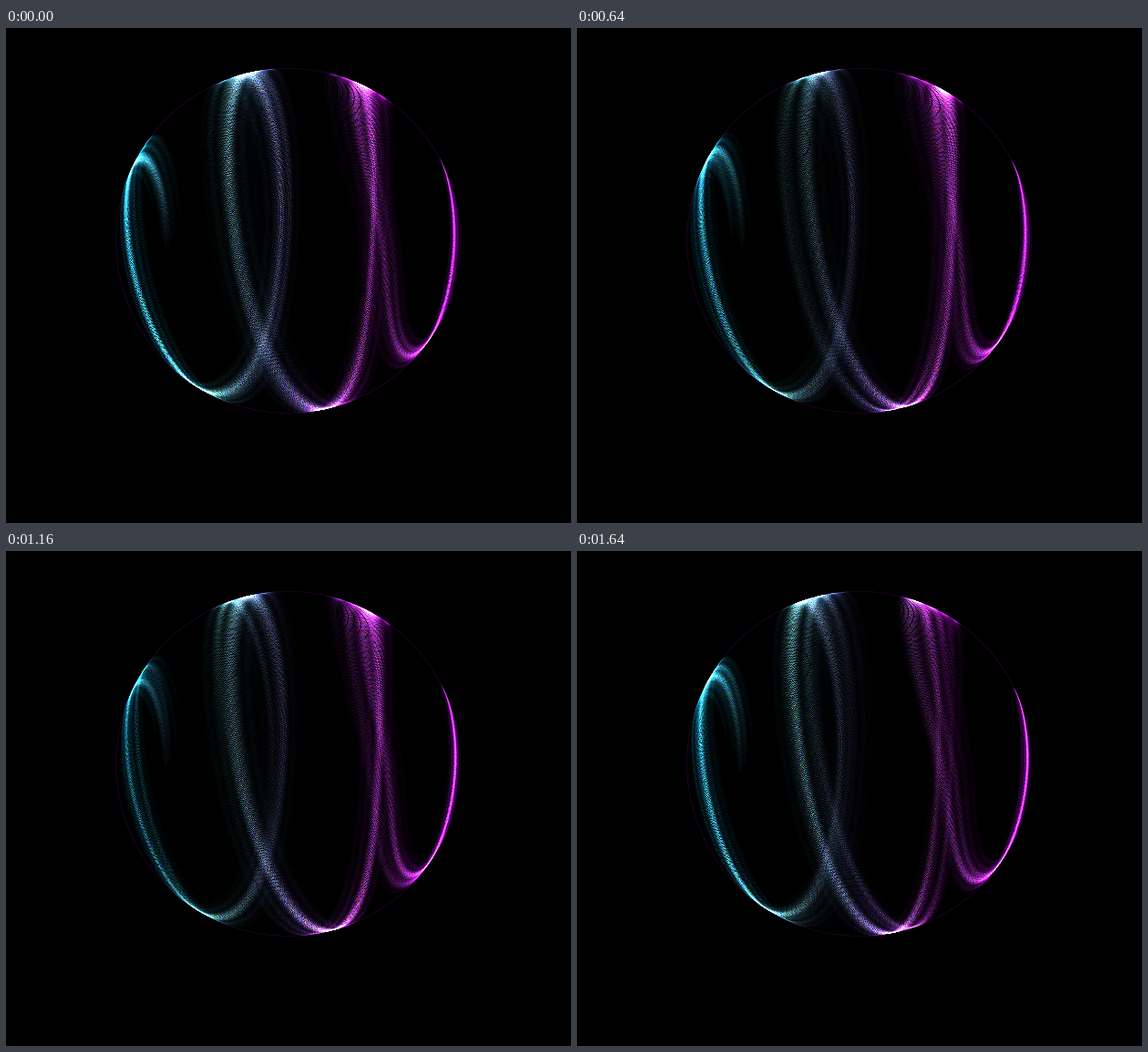
Write an HTML page with a canvas that moves like this. It is 620 px wide and 543 px high and loops after 1680 ms.

```html
<!DOCTYPE html>
<html lang="en">
<head>
<meta charset="utf-8">
<title>Sphere ribbon</title>
<style>
html, body { margin: 0; width: 100%; height: 100%; overflow: hidden; background: #000; }
canvas { display: block; }
</style>
</head>
<body>
<canvas id="stage" width="620" height="543"></canvas>
<script>
const W = 620, H = 543, CX = 309.7, CY = 233.3, R = 189;
const LOOP = 1680, TICK = 40;
const ctx = document.getElementById('stage').getContext('2d');
const img = ctx.createImageData(W, H), px = img.data;

// Ribbon wound around a tilted axis: polar angle and half width (degrees) per quarter turn
const POLAR = [153, 147, 136, 120, 112, 102, 88, 80, 79, 61, 38, 44, 33, 28];
const HALF = [8, 9, 12, 9, 7, 11, 10, 9, 7, 13, 10, 8, 8, 6];
const AXIS_X = 0.944, AXIS_Z = 0.33, TILT = -0.052;

// Bright strand: place across the ribbon and strength, for six half turns at each time
const TIMES = [0, 200, 440, 840, 1160, 1480, 1640];
const PLACE = [
  [0.2, 0, 0, 0.1, 0, 0.2],
  [0.4, -0.7, -0.75, 0, 0.2, 0],
  [-0.6, 0.3, -0.65, -0.4, 0, 0.2],
  [0.4, -0.4, 0.1, -0.3, -0.5, 0],
  [0.2, -0.1, -0.1, -0.2, -0.2, 0],
  [-0.3, 0.1, -0.2, 0, -0.7, -0.2],
  [0, 0.5, 0.2, 0.4, 0.5, -0.2]
];
const POWER = [
  [0.7, 0.9, 0.8, 0.8, 0.5, 0.8],
  [1.1, 0.6, 0.5, 0.7, 0.5, 0.6],
  [0.6, 0.5, 0.8, 0.9, 0.4, 0.7],
  [0.6, 0.3, 0.5, 0.9, 0.5, 1],
  [0.4, 0.5, 0.8, 0.7, 0.5, 0.9],
  [0.6, 0.4, 0.7, 0.9, 0.7, 1],
  [0.7, 0.5, 1, 0.5, 0.5, 0.9]
];
// Colour from left to right: position, r, g, b
const TINT = [[0, 0, 110, 150], [0.3, 30, 80, 85], [0.47, 45, 50, 100], [0.7, 100, 12, 115], [1, 150, 0, 190]];

const clamp = (v, a, b) => Math.min(b, Math.max(a, v));
const mix = (a, b, k) => a + (b - a) * k;
const ease = k => { k = clamp(k, 0, 1); return k * k * (3 - 2 * k); };
const frac = v => v - Math.floor(v);

function spline(list, x) {
  const i = clamp(Math.floor(x), 0, list.length - 2), k = x - i;
  const at = n => list[clamp(n, 0, list.length - 1)];
  const a = at(i - 1), b = at(i), c = at(i + 1), d = at(i + 2);
  return b + 0.5 * k * (c - a + k * (2 * a - 5 * b + 4 * c - d + k * (3 * (b - c) + d - a)));
}

function tint(u) {
  let i = 0;
  while (i < TINT.length - 2 && u > TINT[i + 1][0]) i++;
  const a = TINT[i], b = TINT[i + 1], k = clamp((u - a[0]) / (b[0] - a[0]), 0, 1);
  return [1, 2, 3].map(n => mix(a[n], b[n], k));
}

function project(q, p) {
  const th = (spline(POLAR, q) + p * spline(HALF, q)) * Math.PI / 180;
  const a = q * Math.PI / 2, s = Math.sin(th);
  const x = R * (AXIS_X * Math.cos(th) + AXIS_Z * s * Math.cos(a));
  const y = -R * s * Math.sin(a);
  return [CX + x * Math.cos(TILT) - y * Math.sin(TILT),
          CY + x * Math.sin(TILT) + y * Math.cos(TILT), s];
}

const LANES = 64, STEPS = 1950, Q0 = -0.2, Q1 = 12.75;
const count = LANES * STEPS;
const spot = new Uint32Array(count), gain = new Float32Array(count);
const hue = new Float32Array(count * 3);
const stepQ = i => mix(Q0, Q1, i / STEPS);
const laneP = j => (j + 0.5) / LANES * 2 - 1;

for (let i = 0, n = 0; i < STEPS; i++) {
  for (let j = 0; j < LANES; j++, n++) {
    const q = stepQ(i + 0.9 * Math.sin(j * 0.9));
    const [x, y, s] = project(q, laneP(j));
    spot[n] = (Math.floor(y) * W + Math.floor(x)) * 4;
    gain[n] = s * spline(HALF, q) / 10 * ease((q - Q0) / 1.1) * ease((Q1 - q) / 0.8);
    tint((x - 120) / 380).forEach((c, k) => hue[n * 3 + k] = c);
  }
}

// Faint outline of the sphere
const rim = new Uint8ClampedArray(px.length);
for (let i = 3; i < rim.length; i += 4) rim[i] = 255;
for (let i = 0; i < 2400; i++) {
  const a = i / 2400 * Math.PI * 2;
  const o = (Math.floor(CY + R * Math.sin(a)) * W + Math.floor(CX + R * Math.cos(a))) * 4;
  rim[o] += 13;
  rim[o + 2] += 16;
}

function pose(table, ms) {
  let i = 0;
  while (i < TIMES.length - 2 && ms >= TIMES[i + 1]) i++;
  const k = clamp((ms - TIMES[i]) / (TIMES[i + 1] - TIMES[i]), 0, 1);
  return table[i].map((v, n) => mix(v, table[i + 1][n], k));
}

function draw(ms) {
  const place = pose(PLACE, ms), power = pose(POWER, ms);
  const t = ms / 1000, beat = ms / TICK;
  px.set(rim);
  for (let i = 0, n = 0; i < STEPS; i++) {
    const q = stepQ(i), h = clamp(q / 2 - 1, 0, 5);
    const main = spline(place, h), w = Math.max(0.15, spline(power, h));
    const side = -main * 0.6 + 0.4 * Math.sin(q * 1.1 + t * 2.3);
    for (let j = 0; j < LANES; j++, n++) {
      const p = laneP(j);
      const d = (p - main) / 0.17, e = (p - side) / 0.13;
      const strand = w * (Math.exp(-d * d) + 0.4 * Math.exp(-e * e));
      const fine = 0.5 + 0.5 * Math.sin(p * 17 + q * 0.7 - t * 3);
      const fill = (0.12 + 0.4 * w) * (1 - p * p) * (0.35 + 0.65 * fine);
      const g = gain[n], base = g * (fill * 0.75 + strand * 0.8), white = g * strand * 42;
      if (base < 0.02) continue;
      const o = spot[n], f = frac(i * 0.382 + j * 0.618 + beat * 0.27);
      for (let k = 0; k < 3; k++) {
        px[o + k] += (hue[n * 3 + k] * base + white) * (0.45 + 1.1 * frac(f + k / 3));
      }
    }
  }
  ctx.putImageData(img, 0, 0);
}

const start = performance.now();
let last = -1;
function frame() {
  const tick = Math.floor((performance.now() - start) % LOOP / TICK);
  if (tick !== last) draw((last = tick) * TICK);
  requestAnimationFrame(frame);
}
draw(0);
requestAnimationFrame(frame);
</script>
</body>
</html>
```
